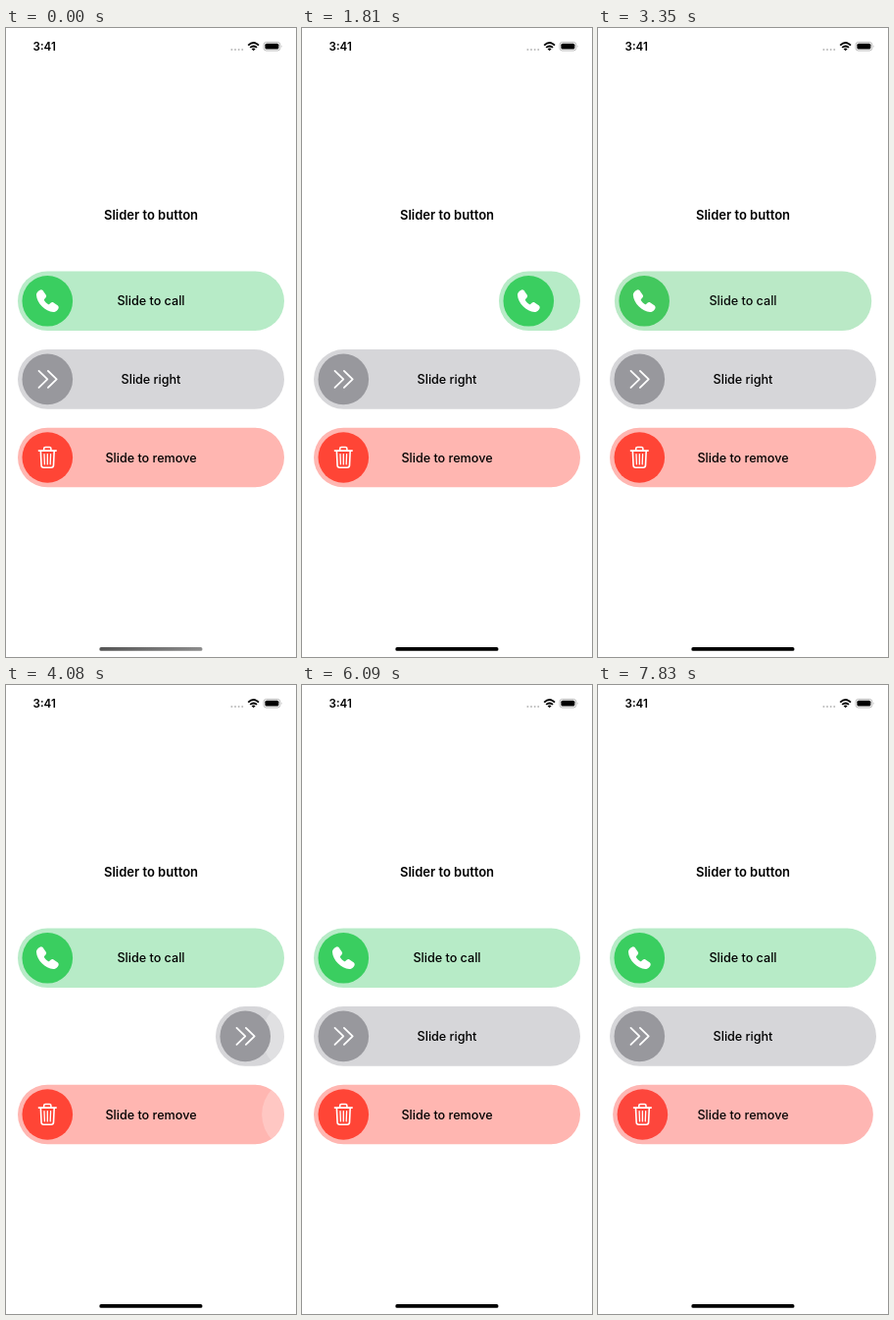
Animation of 296 by 640 pixels, one loop 7.9 s. Source, as an HTML page:

```html
<!DOCTYPE html>
<html lang="en">
<head>
<meta charset="utf-8">
<title>Slider to button</title>
<style>
  html, body { margin: 0; width: 100%; height: 100%; overflow: hidden; background: #fff; }
  svg { display: block; width: 100vw; height: 100vh; }
  text { font-family: Inter, "Open Sans", sans-serif; }
  .label { font-size: 12.6px; font-weight: 500; text-anchor: middle; }
  .line { fill: none; stroke: #fff; stroke-linecap: round; stroke-linejoin: round; }
</style>
</head>
<body>
<svg viewBox="0 0 296 640" xmlns="http://www.w3.org/2000/svg">
  <defs>
    <linearGradient id="barFade">
      <stop offset="0" stop-color="#555"/>
      <stop offset="1" stop-color="#8c8c8c"/>
    </linearGradient>
    <g id="phone">
      <path fill="#fff" d="M-11.3-6C-11.4-8.5-9-11-7-11.4C-5.5-11.6-4.7-10.8-3.9-9.6L-1.6-6.3C-.9-5.2-1-4.3-1.9-3.3L-3.2-1.9C-3.6-1.4-3.5-1-3.2-.5C-2 1.4-.9 2.4.6 3.3C1.2 3.6 1.5 3.5 1.9 3.1L3.3 1.9C4.3 1 5.2.9 6.3 1.6L9.6 3.9C10.8 4.7 11.6 5.5 11.4 7C11 9 8.5 11.3 6 11.3C-2 11-11 2-11.3-6Z"/>
    </g>
    <g id="chevrons">
      <path class="line" stroke-width="1.8" d="M-8.8-8.5L0 0L-8.8 8.5M.6-8.5L9.4 0L.6 8.5"/>
    </g>
    <g id="trash">
      <path class="line" stroke-width="1.6" d="M-8.9-6.9H8.9M-3.6-7V-9Q-3.6-10.5-2.1-10.5H2.1Q3.6-10.5 3.6-9V-7M-6.9-6.7L-6.2 8.2Q-6 10.2-4 10.2H4Q6 10.2 6.2 8.2L6.9-6.7"/>
      <path class="line" stroke-width="1.3" d="M-3.3-3.4L-2.9 6.9M0-3.4V6.9M3.3-3.4L2.9 6.9"/>
    </g>
  </defs>
  <rect width="296" height="640" fill="#fff"/>

  <text x="27.5" y="23" font-size="11.6" font-weight="600">3:41</text>
  <g fill="#bbb">
    <circle cx="230.4" cy="22" r="1"/><circle cx="234" cy="22" r="1"/>
    <circle cx="237.6" cy="22" r="1"/><circle cx="241.2" cy="22" r="1"/>
  </g>
  <g fill="none" stroke="#000" stroke-width="1.9">
    <path d="M247.2 17.6Q252.6 12.6 258 17.6"/>
    <path d="M249.2 19.9Q252.6 16.9 256 19.9"/>
    <path fill="#000" stroke="none" d="M250.6 21.2Q252.6 19.6 254.6 21.2L252.6 23.3Z"/>
  </g>
  <rect x="263" y="14.4" width="16.8" height="8.6" rx="2.6" fill="none" stroke="#aaa" stroke-width=".8"/>
  <rect x="264.4" y="15.8" width="14" height="5.8" rx="1.5"/>
  <path d="M280.9 17.3Q282.2 18.7 280.9 20.1Z" fill="#aaa"/>

  <text x="148" y="195.2" font-size="13" font-weight="600" text-anchor="middle">Slider to button</text>
  <g id="sliders"></g>
  <rect id="homeBar" x="95.3" y="630.1" width="105.2" height="3.7" rx="1.85"/>
</svg>
<script>
const LOOP = 7900, LEFT = 12, RIGHT = 284, HALF = 30.3, THUMB = 25.8;
const DRAG = 325, MOVE = 380, ICON_LAG = 50;
const SHINE_START = 1070, SHINE_PERIOD = 2510, SHINE_SPEED = 0.65;

const green = { thumb: [58, 206, 96], track: [183, 235, 199] };
const gray = { thumb: [152, 152, 157], track: [214, 214, 217] };
const red = { thumb: [255, 69, 54], track: [255, 182, 177] };
const purple = { thumb: [191, 90, 242], track: [229, 189, 250] };

const sliders = [
  { y: 277.8, mid: 149.2, text: "Slide to call", icon: "phone", from: green, to: red, release: 1860, reset: 3020 },
  { y: 357.4, mid: 147.9, text: "Slide right", icon: "chevrons", from: gray, to: gray, release: 4105, reset: 5390 },
  { y: 437, mid: 147.6, text: "Slide to remove", icon: "trash", from: red, to: purple, release: 6440, reset: 7490 }
];

const clamp = v => Math.min(1, Math.max(0, v));
const lerp = (a, b, p) => a + (b - a) * p;
const smooth = p => p * p * (3 - 2 * p);
const span = (t, start, length) => clamp((t - start) / length);
const mix = (a, b, p) => `rgb(${a.map((v, i) => Math.round(lerp(v, b[i], p)))})`;

function add(parent, tag, attrs) {
  const el = document.createElementNS("http://www.w3.org/2000/svg", tag);
  set(el, attrs);
  parent.append(el);
  return el;
}

function set(el, attrs) {
  for (const key in attrs) el.setAttribute(key, attrs[key]);
}

sliders.forEach((s, i) => {
  const group = add(document.getElementById("sliders"), "g", {});
  const pill = { y: s.y - HALF, height: HALF * 2, rx: HALF };
  const clip = add(group, "clipPath", { id: "clip" + i });
  s.mask = add(clip, "rect", pill);
  s.track = add(group, "rect", pill);
  const inner = add(group, "g", { "clip-path": `url(#clip${i})` });
  s.label = add(inner, "text", { class: "label", x: 148, y: s.y + 4.5 });
  s.label.textContent = s.text;
  s.shine = add(inner, "circle", { cy: s.y, r: 37.5, fill: "#fff", "fill-opacity": 0.23 });
  s.knob = add(group, "circle", { cy: s.y, r: THUMB });
  s.glyph = add(group, "use", { href: "#" + s.icon });
});

function pose(s, t) {
  const rest = LEFT + HALF, end = RIGHT - HALF;
  if (t >= s.reset) {
    const p = smooth(span(t, s.reset, MOVE));
    const x = lerp(s.mid, rest, p);
    return { left: x - HALF, right: lerp(s.mid + HALF, RIGHT, p), knob: x, icon: x, tint: 1 - p, text: p };
  }
  if (t >= s.release) {
    const p = smooth(span(t, s.release, MOVE));
    const late = smooth(span(t, s.release + ICON_LAG, MOVE));
    const x = lerp(end, s.mid, p);
    return { left: x - HALF, right: lerp(RIGHT, s.mid + HALF, late), knob: x, icon: lerp(end, s.mid, late), tint: p, text: 0 };
  }
  const d = span(t, s.release - DRAG, DRAG);
  const x = lerp(rest, end, (d + smooth(d)) / 2);
  return { left: x - HALF, right: RIGHT, knob: x, icon: x, tint: 0, text: 1 - d };
}

function draw(t) {
  const since = t - SHINE_START;
  const pass = Math.floor(since / SHINE_PERIOD);
  const shineX = -27 + SHINE_SPEED * (since - pass * SHINE_PERIOD);

  sliders.forEach((s, i) => {
    const p = pose(s, t);
    const extent = { x: p.left, width: p.right - p.left };
    set(s.mask, extent);
    set(s.track, { ...extent, fill: mix(s.from.track, s.to.track, p.tint) });
    set(s.knob, { cx: p.knob, fill: mix(s.from.thumb, s.to.thumb, p.tint) });
    set(s.glyph, { x: p.icon, y: s.y });
    set(s.label, { opacity: p.text });
    // A slider stops shining once it has been used.
    set(s.shine, { cx: shineX, visibility: pass >= 0 && pass <= i ? "visible" : "hidden" });
  });
  set(document.getElementById("homeBar"), { fill: t < 1530 ? "url(#barFade)" : "#000" });
}

const began = performance.now();
function tick() {
  draw((performance.now() - began) % LOOP);
  requestAnimationFrame(tick);
}
tick();
</script>
</body>
</html>
```
